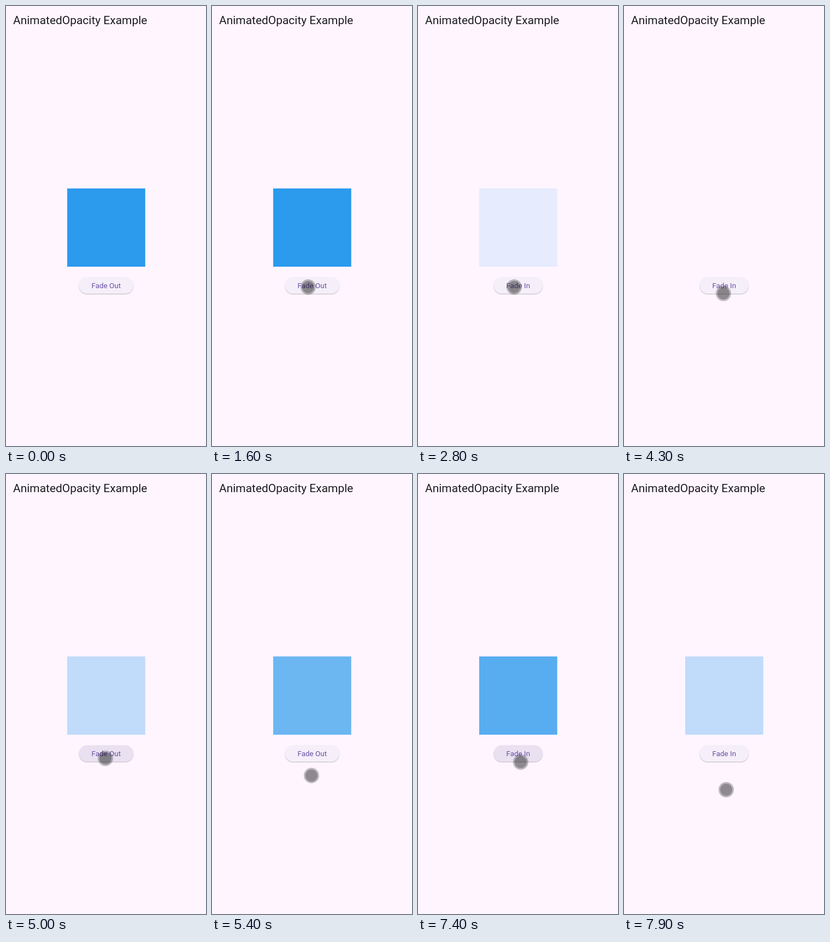
An HTML page with a canvas for the animation above (8 s loop, 366x800 px).

```html
<!DOCTYPE html>
<html lang="en">
<head>
<meta charset="utf-8">
<title>AnimatedOpacity Example</title>
<style>
  html, body { margin: 0; width: 100%; height: 100%; overflow: hidden; background: #fef5ff; }
  canvas { display: block; }
</style>
</head>
<body>
<canvas id="stage" width="366" height="800"></canvas>
<script>
const ctx = document.getElementById('stage').getContext('2d');
const LOOP = 8000, STEP = 100, FADE = 1000;
const MID = 183.3;

// Each tap toggles the square when released
const taps = [
  { down: 1850, up: 1910 },
  { down: 4550, up: 4710 },
  { down: 6760, up: 7190 },
];

// Pointer strokes; the pointer rests between them
const entry = { x: 384, y: 449 };
const strokes = [
  { from: 0, to: 900, x: 178, y: 515 },
  { from: 900, to: 1200, x: 184, y: 506 },
  { from: 1200, to: 1600, x: 176, y: 511 },
  { from: 2800, to: 3500, x: 182, y: 536 },
  { from: 3850, to: 4550, x: 182, y: 517 },
  { from: 5100, to: 5500, x: 182, y: 554 },
  { from: 5500, to: 6200, x: 188, y: 516 },
  { from: 7250, to: 7900, x: 187, y: 574 },
];

const ramp = (t, from, span) => Math.min(1, Math.max(0, (t - from) / span));
const ease = k => k * k * (3 - 2 * k);
const mix = (a, b, k) => a + (b - a) * k;

function pointerAt(t) {
  let { x, y } = entry;
  for (const s of strokes) {
    const k = ease(ramp(t, s.from, s.to - s.from));
    x = mix(x, s.x, k);
    y = mix(y, s.y, k);
  }
  return { x, y };
}

function stateAt(t) {
  const state = { shown: true, opacity: 1, press: 0 };
  for (const { down, up } of taps) {
    if (t >= down) state.press = ramp(t, down, 150) * (1 - ramp(t, up + 300, 250));
    if (t >= up) {
      const k = ramp(t, up, FADE);
      state.shown = !state.shown;
      state.opacity = state.shown ? k : 1 - k;
    }
  }
  return state;
}

function text(str, x, y, size, color, align) {
  ctx.font = `400 ${size}px Roboto, sans-serif`;
  ctx.textAlign = align;
  ctx.fillStyle = color;
  ctx.fillText(str, x, y);
}

function button(label, width, press) {
  ctx.beginPath();
  ctx.roundRect(MID - width / 2, 493.3, width, 29.7, 14.85);
  ctx.save();
  ctx.shadowColor = 'rgba(0,0,0,.26)';
  ctx.shadowBlur = 1.5;
  ctx.shadowOffsetY = 1;
  ctx.fillStyle = '#f5eff9';
  ctx.fill();
  ctx.restore();
  ctx.fillStyle = `rgba(90,70,130,${0.08 * press})`;
  ctx.fill();
  text(label, MID, 513, 13.4, '#6750a4', 'center');
}

function disc(x, y, r) {
  ctx.beginPath();
  ctx.arc(x, y, r, 0, Math.PI * 2);
  ctx.fillStyle = 'rgba(0,0,0,.25)';
  ctx.fill();
}

function draw(t) {
  const { shown, opacity, press } = stateAt(t);
  ctx.fillStyle = '#fef5ff';
  ctx.fillRect(0, 0, 366, 800);
  text('AnimatedOpacity Example', 13, 33, 20.95, '#1d1b20', 'left');

  ctx.globalAlpha = opacity;
  ctx.fillStyle = '#2c9aed';
  ctx.fillRect(112, 331.7, 142.8, 142.3);
  ctx.globalAlpha = 1;

  if (shown) button('Fade Out', 99.5, press);
  else button('Fade In', 89.5, press);

  const { x, y } = pointerAt(t);
  disc(x, y, 14);
  disc(x, y, 11);
}

function tick() {
  const t = performance.now() % LOOP;
  draw(Math.floor(t / STEP) * STEP);
  requestAnimationFrame(tick);
}
tick();
</script>
</body>
</html>
```
